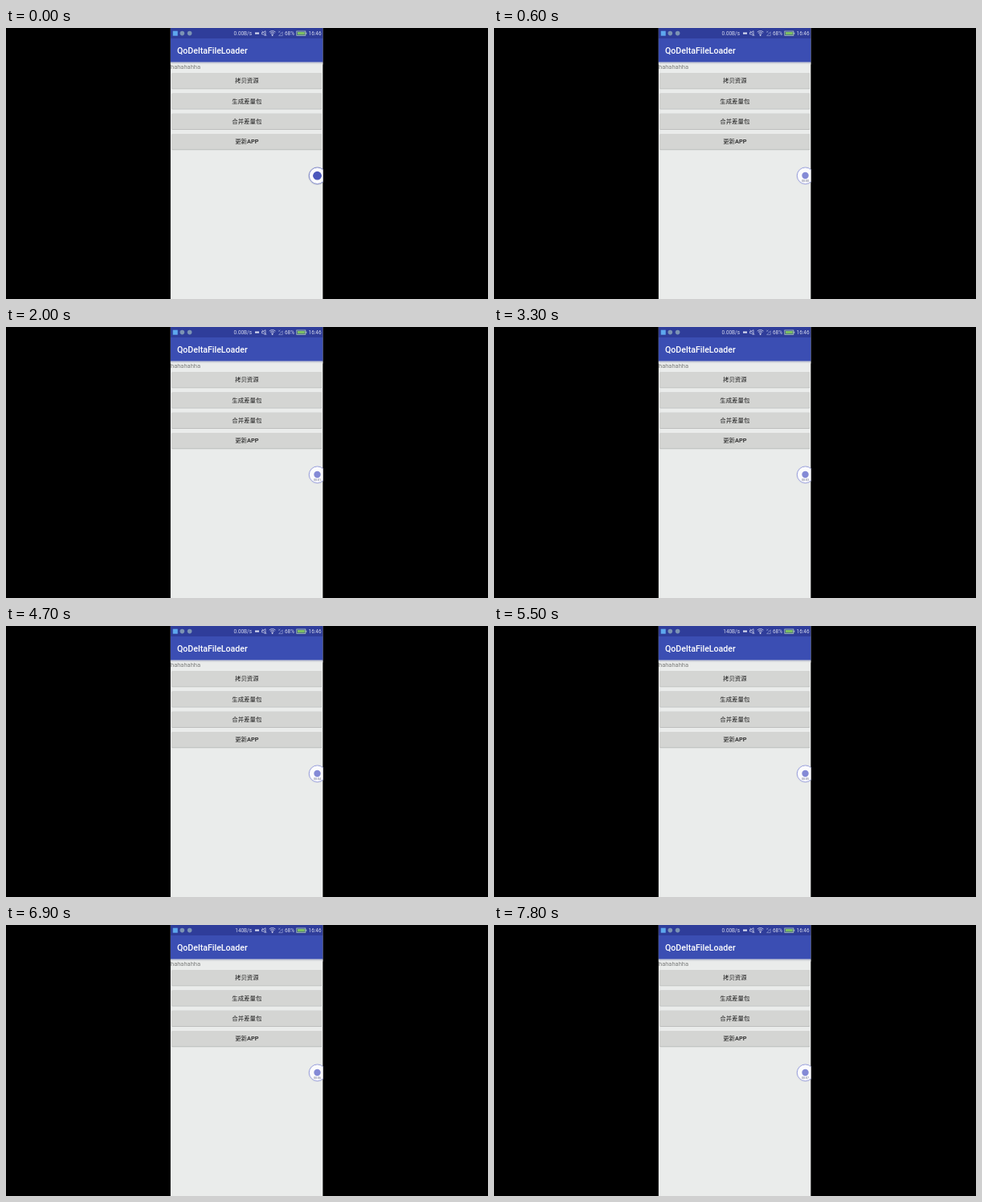
Recreate the animation shown at these times as an HTML page with a canvas. Size 600 by 338 pixels, loop 8000 ms.

```html
<!DOCTYPE html>
<html lang="zh">
<head>
<meta charset="utf-8">
<style>
html, body { margin: 0; width: 100%; height: 100%; overflow: hidden; background: #000; }
canvas { display: block; width: 600px; height: 338px; }
</style>
</head>
<body>
<canvas id="stage"></canvas>
<script>
const LOOP = 8000, LEFT = 204.6, WIDTH = 190, HEIGHT = 338;
const PRESS = 5800, RELEASE = 6100;
const FONT = 'Roboto, "Noto Sans CJK SC", "Noto Sans CJK", sans-serif';
const canvas = document.getElementById('stage');
const ctx = canvas.getContext('2d');
const dpr = window.devicePixelRatio || 1;
canvas.width = 600 * dpr;
canvas.height = HEIGHT * dpr;

const clamp = v => Math.max(0, Math.min(1, v));
const span = (t, a, b) => clamp((t - a) / (b - a));
const mix = (a, b, k) => a + (b - a) * k;

function rect(x, y, w, h, color) {
  ctx.fillStyle = color;
  ctx.fillRect(x, y, w, h);
}

function disc(x, y, r, color) {
  ctx.fillStyle = color;
  ctx.beginPath();
  ctx.arc(x, y, r, 0, 7);
  ctx.fill();
}

function ring(x, y, r, color, width, from = 0, to = Math.PI * 2) {
  ctx.strokeStyle = color;
  ctx.lineWidth = width;
  ctx.beginPath();
  ctx.arc(x, y, r, from, to);
  ctx.stroke();
}

function line(color, width, ...pts) {
  ctx.strokeStyle = color;
  ctx.lineWidth = width;
  ctx.beginPath();
  for (let i = 0; i < pts.length; i += 2) ctx.lineTo(pts[i], pts[i + 1]);
  ctx.stroke();
}

function text(str, x, y, size, color, align = 'left', weight = 400) {
  ctx.font = `${weight} ${size}px ${FONT}`;
  ctx.textAlign = align;
  ctx.fillStyle = color;
  ctx.fillText(str, x, y);
}

function box(x, y, w, h, r, color) {
  ctx.fillStyle = color;
  ctx.beginPath();
  ctx.roundRect(x, y, w, h, r);
  ctx.fill();
}

function statusBar(t) {
  const ink = '#d5d9ee', back = '#2f3d9a', faint = '#909bd0';
  rect(LEFT, 0, WIDTH, 13, back);
  rect(207.7, 3.7, 6, 6, '#5ea7ee');
  disc(219.3, 6.6, 2.8, '#7b93b4');
  disc(228.6, 6.6, 2.8, '#7b93b4');

  const busy = t >= 5400 && t < 7200;
  text(busy ? '140B/s' : '0.00B/s', 306, 9.1, 6.4, ink, 'right');

  rect(310, 5.5, 5, 2.2, ink);

  // muted speaker
  line(ink, 0.7, 318.5, 5.5, 320, 5.5, 323, 3.7, 323, 9.6, 320, 7.8, 318.5, 7.8, 318.5, 5.5);
  line(ink, 0.6, 318.7, 3.6, 324.3, 9.7);

  for (const r of [2.2, 4, 5.8]) ring(331.6, 9.4, r, ink, 0.8, -2.3, -0.84);
  disc(331.6, 9.2, 0.9, ink);

  // weak signal
  line(faint, 0.8, 339.3, 3.7, 341.3, 5.7);
  line(faint, 0.8, 341.3, 3.7, 339.3, 5.7);
  line(faint, 0.7, 339.6, 9.6, 344.2, 9.6, 344.2, 4.8, 339.6, 9.6);

  text('68%', 347, 9.1, 6.4, ink);
  ctx.strokeStyle = '#b9d5b9';
  ctx.lineWidth = 0.8;
  ctx.strokeRect(361.8, 4, 11, 5.3);
  rect(373.2, 5.6, 1, 2.2, '#b9d5b9');
  rect(362.8, 5, 9, 3.4, '#7cbf62');
  text('16:46', 392.5, 9.1, 6.4, ink, 'right');
}

function appBar() {
  rect(LEFT, 13, WIDTH, 29.7, '#3b4eb3');
  const shade = ctx.createLinearGradient(0, 42.7, 0, 45.5);
  shade.addColorStop(0, '#bfc2cf');
  shade.addColorStop(1, '#eaeceb');
  rect(LEFT, 42.7, WIDTH, 2.8, shade);
  text('QoDeltaFileLoader', 213, 32.4, 10.6, '#fff', 'left', 500);
}

function button(label, row, lift = 0, overlay) {
  const x = 206.4, y = 56 + 25.3 * row, w = 186.6, h = 19.4;
  box(x, y + 0.5, w, h + 0.4 + lift, 1, '#bcbebd');
  box(x, y, w, h, 1, '#d4d5d3');
  if (overlay) {
    ctx.save();
    ctx.beginPath();
    ctx.roundRect(x, y, w, h, 1);
    ctx.clip();
    overlay();
    ctx.restore();
  }
  text(label, 299.8, y + 12.3, 7.4, '#1c1c1c', 'center', 500);
}

function ripple(t) {
  const slow = span(t, PRESS, RELEASE), fast = span(t, RELEASE, 6450);
  const r = 2 + 13 * slow + 90 * fast;
  const x = mix(356, 300, 0.14 * slow + 0.86 * fast);
  const alpha = 0.12 * span(t, PRESS, 5880) * (1 - span(t, 6250, 6650));
  rect(206, 55, 188, 22, `rgba(0,0,0,${alpha * 0.2})`);
  disc(x, 66, r, `rgba(0,0,0,${alpha})`);
}

function touchDot(t) {
  if (t < PRESS || t >= RELEASE) return;
  disc(356, 68, 5.9, 'rgba(120,124,126,.55)');
  disc(356, 67.8, 5.2, '#dfe2e5');
}

// screen-recorder bubble: dims, then counts the seconds
function recorder(t) {
  const k = span(t, 100, 500);
  const x = 387.6, y = 184.2;
  const channel = (a, b) => Math.round(mix(a, b, k));
  disc(x, y + 0.3, 11.3, `rgba(110,115,140,${mix(0.3, 0.12, k)})`);
  disc(x, y, 10.7, '#fbfbfd');
  ring(x, y, 10.3, `rgb(${channel(112, 142)},${channel(122, 149)},${channel(196, 216)})`, 0.9);
  disc(x - 0.1, y - 0.2 * k, mix(5.4, 4.2, k),
    `rgb(${channel(76, 132)},${channel(88, 138)},${channel(188, 214)})`);
  if (k > 0) {
    const sec = Math.max(0, Math.floor((t - 200) / 1000));
    text('00:0' + sec, x, 191.8, 3.7, `rgba(105,108,135,${k})`, 'center');
  }
}

function draw(t) {
  ctx.setTransform(dpr, 0, 0, dpr, 0, 0);
  rect(0, 0, 600, HEIGHT, '#000');
  ctx.save();
  ctx.beginPath();
  ctx.rect(LEFT, 0, WIDTH, HEIGHT);
  ctx.clip();
  rect(LEFT, 0, WIDTH, HEIGHT, '#eaeceb');
  statusBar(t);
  appBar();
  text('hahahahha', 205, 50.9, 7.5, '#7b7d7c');
  const lift = 1.6 * span(t, PRESS, 5900) * (1 - span(t, 6150, 6300));
  const pressed = t > PRESS && t < 6650;
  button('拷贝资源', 0, lift, pressed && (() => ripple(t)));
  button('生成差量包', 1);
  button('合并差量包', 2);
  button('更新APP', 3);
  touchDot(t);
  recorder(t);
  ctx.restore();
}

const start = performance.now();
function tick() {
  draw((performance.now() - start) % LOOP);
  requestAnimationFrame(tick);
}
tick();
</script>
</body>
</html>
```
